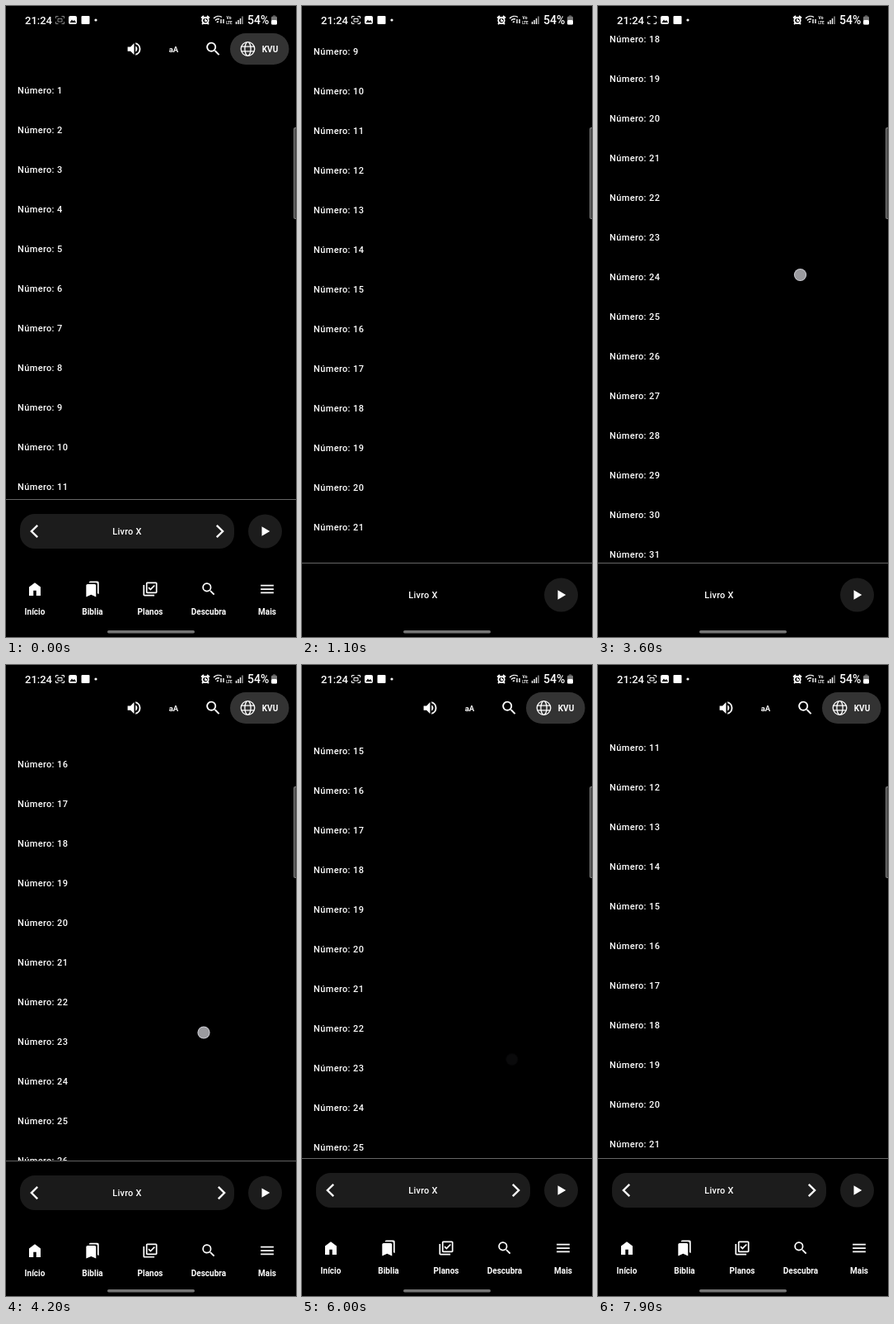
Recreate the animation shown at these times as an HTML page with a canvas. Size 352 by 764 pixels, loop 8 s.

```html
<!DOCTYPE html>
<html lang="pt">
<head>
<meta charset="utf-8">
<style>
  html, body { margin: 0; height: 100%; overflow: hidden; background: #000; }
  canvas { display: block; }
</style>
</head>
<body>
<canvas id="stage" width="352" height="764"></canvas>
<script>
const ctx = document.getElementById('stage').getContext('2d');
const LOOP = 8000, STEP = 100, ROW = 48, STATUS = 24, HEADER = 56, SLIDE = 77;

// Tracks are [time, value] pairs.
const scroll = [[0, 46], [500, -247], [1100, -329], [1800, -329], [2100, -510], [2900, -776],
  [3600, -776], [4200, -656.5], [4400, -632], [4900, -700], [5200, -700], [6000, -624],
  [6500, -624], [7400, -436]];
const headerShown = [[0, 1], [300, 0], [3600, 0], [4000, 1], [4400, 1], [4800, 0], [5200, 0], [5600, 1]];
const footerHidden = [[0, 0], [400, 1], [3600, 1], [4200, .04], [4300, 0], [4400, 0], [4900, 1],
  [5200, 1], [5800, 0]];
const fingerX = [[0, 255], [500, 268.5], [900, 284], [1800, 236], [2100, 249.5], [2700, 289],
  [3600, 245.5], [4200, 240], [5900, 255], [6500, 252], [7300, 261]];
// While touching, the finger moves with the list at a fixed offset.
const touches = [
  { from: 100, to: 900, offset: 450 },
  { from: 1900, to: 2700, offset: 948.5 },
  { from: 3600, to: 5900, offset: 1101.5 },
  { from: 6600, to: 7300, offset: 1140 },
];

const icons = {
  home: 'M4 21V9l8-6 8 6v12h-6v-7h-4v7z',
  volume: 'M3 9v6h4l5 5V4L7 9zM16.5 12c0-1.8-1-3.3-2.5-4v8c1.5-.7 2.5-2.2 2.5-4zM14 3.2v2.1a7 7 0 0 1 0 13.4v2.1a9 9 0 0 0 0-17.6z',
  search: 'M15.5 14h-.8l-.3-.3A6.5 6.5 0 1 0 13.7 14.4l.3.3v.8l5 5 1.5-1.5zM9.5 14a4.5 4.5 0 1 1 0-9 4.5 4.5 0 0 1 0 9z',
  books: 'M19 18l2 1V3c0-1.1-.9-2-2-2H9C7.9 1 7 1.9 7 3h10c1.1 0 2 .9 2 2zM15 5H5c-1.1 0-2 .9-2 2v16l7-3 7 3V7c0-1.1-.9-2-2-2z',
  plans: 'M20 4v12H8V4zM8 2c-1.1 0-2 .9-2 2v12c0 1.1.9 2 2 2h12c1.1 0 2-.9 2-2V4c0-1.1-.9-2-2-2zM12.5 14L9 10.5l1.4-1.4 2.1 2.1L17.6 6 19 7.4zM4 6H2v14c0 1.1.9 2 2 2h14v-2H4z',
  menu: 'M3 18h18v-2H3zM3 13h18v-2H3zM3 6v2h18V6z',
};
for (const name in icons) icons[name] = new Path2D(icons[name]);

// Monotone cubic interpolation: smooth, without overshoot.
function sample(track, t) {
  const i = track.findIndex(key => key[0] > t);
  if (i < 0) return track[track.length - 1][1];
  const slope = k => k < 1 || k >= track.length ? 0
    : (track[k][1] - track[k - 1][1]) / (track[k][0] - track[k - 1][0]);
  const tangent = k => {
    const a = slope(k), b = slope(k + 1);
    return a * b > 0 ? 2 * a * b / (a + b) : 0;
  };
  const [t0, v0] = track[i - 1], [t1, v1] = track[i];
  const d = t1 - t0, u = (t - t0) / d, s = u * u * (3 - 2 * u);
  return v0 + (v1 - v0) * s
    + d * u * (1 - u) * ((1 - u) * tangent(i - 1) - u * tangent(i));
}

function text(str, x, y, size, weight = 500, align = 'center', spacing = 0) {
  ctx.font = `${weight} ${size}px Roboto, sans-serif`;
  ctx.textAlign = align;
  ctx.letterSpacing = spacing + 'px';
  ctx.fillStyle = '#fff';
  ctx.fillText(str, x, y);
}

function icon(name, x, y, size) {
  ctx.save();
  ctx.translate(x - size / 2, y - size / 2);
  ctx.scale(size / 24, size / 24);
  ctx.fillStyle = '#fff';
  ctx.fill(icons[name], 'evenodd');
  ctx.restore();
}

function box(x, y, w, h, r, color) {
  ctx.fillStyle = color;
  ctx.beginPath();
  ctx.roundRect(x, y, w, h, r);
  ctx.fill();
}

function disc(x, y, r, color) {
  box(x - r, y - r, 2 * r, 2 * r, r, color);
}

function line(path, width = 1, color = '#fff') {
  ctx.strokeStyle = color;
  ctx.lineWidth = width;
  ctx.stroke(new Path2D(path));
}

function drawList(top, bottom, firstY) {
  ctx.save();
  ctx.beginPath();
  ctx.rect(0, top, 352, bottom - top);
  ctx.clip();
  for (let n = 1; n <= 40; n++) {
    const y = firstY + (n - 1) * ROW;
    if (y > top - 10 && y < bottom + 10) text('Número: ' + n, 14, y + 4, 11, 500, 'left', .38);
  }
  ctx.restore();
}

function drawHeader(shown) {
  if (shown <= 0) return;
  ctx.save();
  ctx.translate(0, -HEADER * (1 - shown));
  icon('volume', 155.5, 52, 21);
  text('aA', 203.5, 55.5, 9.5, 700);
  icon('search', 251.5, 52, 22);
  box(272, 33, 71.5, 38, 19, '#333');
  line('M285.2 52a8.3 8.3 0 1 0 16.6 0a8.3 8.3 0 1 0-16.6 0M289.9 52a3.6 8.3 0 1 0 7.2 0a3.6 8.3 0 1 0-7.2 0M286 49.2h15M286 54.8h15', 1.3);
  text('KVU', 320.5, 55.5, 10, 700);
  ctx.restore();
}

function drawFooter(hidden) {
  const spread = Math.min(2, hidden * 50);
  ctx.save();
  ctx.translate(0, SLIDE * hidden);
  ctx.fillStyle = '#000';
  ctx.fillRect(0, 597, 352, 170);
  ctx.fillStyle = '#666';
  ctx.fillRect(0, 597, 352, 1);
  ctx.globalAlpha = 1 - hidden;
  box(17, 615, 260, 42, 18, '#1c1c1c');
  line('M38.2 628.8l-7.3 7.2 7.3 7.2', 2.4);
  line(`M${255.8 + spread} 628.8l7.3 7.2-7.3 7.2`, 2.4);
  ctx.globalAlpha = 1;
  text('Livro X', 147, 640, 11, 500, 'center', .25);
  disc(314.5, 636, 20.5, '#1c1c1c');
  ctx.fillStyle = '#fff';
  ctx.fill(new Path2D('M310.5 630.3v11.4l9.8-5.7z'));
  [['home', 'Início', 35, 21], ['books', 'Biblia', 105, 20.5], ['plans', 'Planos', 175, 20.5],
    ['search', 'Descubra', 246, 20.5], ['menu', 'Mais', 317, 21]].forEach(([name, label, x, size]) => {
    icon(name, x, 706, size);
    text(label, x, 737, 10, 700);
  });
  ctx.restore();
}

function drawStatus(t) {
  ctx.fillStyle = '#000';
  ctx.fillRect(0, 0, 352, STATUS);
  text('21:24', 23, 21.5, 13, 500, 'left');
  ctx.globalAlpha = t < STEP ? .5 : 1;
  line('M60.5 15v-2.5h3M67.5 12.5h3V15M70.5 19v2.5h-3M63.5 21.5h-3V19');
  if (Math.floor((t + 100) / 500) % 2 === 0) line('M63 15.5h5v3.5h-5z');
  ctx.globalAlpha = 1;
  box(76, 12, 10, 10, 2, '#fff');
  ctx.fillStyle = '#000';
  ctx.fill(new Path2D('M77.5 20l2.5-3.5 1.5 2 1.5-1.5 2 3z'));
  box(91.5, 12, 10, 10, 1, '#fff');
  disc(109, 17, 1.6, '#fff');

  line('M238.3 17.5a3.7 3.7 0 1 0 7.4 0a3.7 3.7 0 1 0-7.4 0M242 15.5v2.5h2M237 14.5l3-2.5M247 14.5l-3-2.5M238 22l2-2M246 22l-2-2', 1.8);
  line('M252 15a8 8 0 0 1 10-1.5M254 17.5a5 5 0 0 1 5-1.5M256 20a2 2 0 0 1 2-1M261 16v5M264 21v-5', 1.4);
  text('Vo', 270.5, 16, 5, 700);
  text('LTE', 271, 21.5, 4.5, 700);
  line('M279.5 22v-3M282 22v-5M284.5 22v-7', 1.4);
  line('M287 22V12.5', 1.4, '#999');
  text('54%', 293, 21.5, 14, 500, 'left');
  box(322, 12.5, 7, 10, 1.5, '#777');
  box(322, 17, 7, 5.5, 1.5, '#fff');
  box(324, 11.5, 3, 1, 0, '#777');
}

function drawTouch(t, offset) {
  const touch = touches.find(({ from, to }) => t >= from && t <= to + STEP);
  if (!touch) return;
  const x = sample(fingerX, t), y = offset + touch.offset;
  ctx.globalAlpha = t > touch.to ? .03 : 1;
  disc(x, y, 7.6, '#cdcdd4');
  disc(x, y, 6.6, '#9b9b9f');
  ctx.globalAlpha = 1;
}

function draw(t) {
  const offset = sample(scroll, t);
  const shown = sample(headerShown, t), hidden = sample(footerHidden, t);
  ctx.fillStyle = '#000';
  ctx.fillRect(0, 0, 352, 764);
  drawList(STATUS + HEADER * shown, 597 + SLIDE * hidden, offset + HEADER * shown);
  drawHeader(shown);
  drawFooter(hidden);
  drawStatus(t);
  box(349, 147, 6, 111, 2, '#7c7c7c');
  box(350, 148, 6, 109, 1.5, '#4c4c4c');
  box(123, 756, 106, 3.5, 1.7, '#747474');
  drawTouch(t, offset);
}

// The screen advances ten times a second.
const start = performance.now();
function tick() {
  const t = (performance.now() - start) % LOOP;
  draw(Math.floor(t / STEP) * STEP);
  requestAnimationFrame(tick);
}
tick();
</script>
</body>
</html>
```
